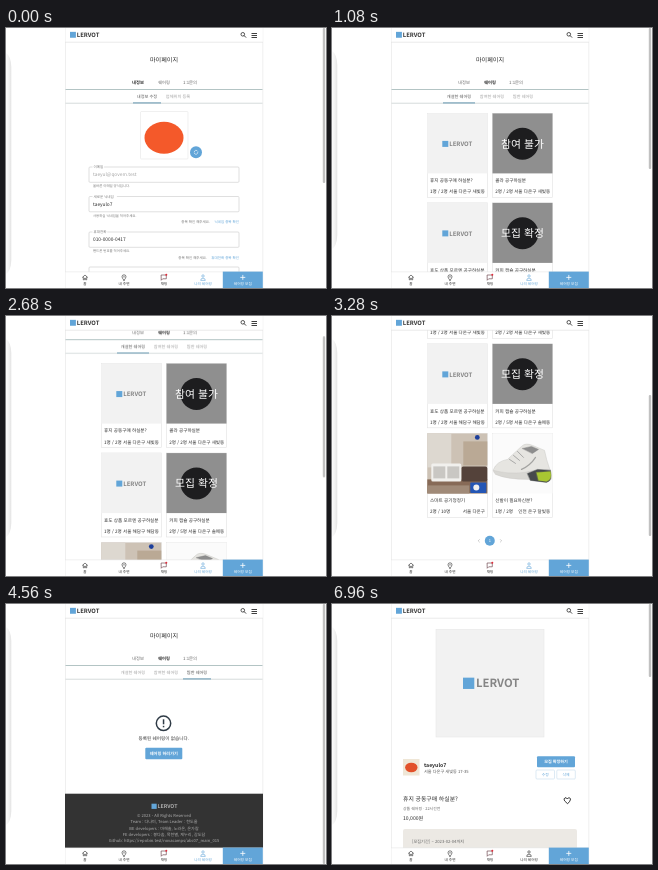
Write an HTML page that moves like this. It is 320 px wide and 260 px high and loops after 7 s.

```html
<!DOCTYPE html>
<html lang="ko">
<head>
<meta charset="utf-8">
<title>마이페이지</title>
<style>
html, body { margin: 0; width: 100%; height: 100%; overflow: hidden; background: #fff; }
svg { display: block; width: 320px; height: 260px; }
text {
  font-family: "Noto Sans CJK KR", "Noto Sans CJK", "Noto Sans", sans-serif;
  text-rendering: geometricPrecision;
  white-space: pre;
}
.show { opacity: 0; animation: 7s step-end infinite; }
.profile { animation-name: profile; }
.sharing { animation-name: sharing; }
.list { animation-name: list; }
.made { animation-name: made; }
.joined { animation-name: joined; }
.empty { animation-name: empty; }
.mypage { animation-name: mypage; }
.detail { animation-name: detail; }
.tipA { animation-name: tipA; }
.tipB { animation-name: tipB; }
.scroll { animation: scroll 7s infinite; }
.thumb { animation: thumb 7s infinite; }
.line { animation: line 7s infinite; }

/* 100% = 7000 ms */
@keyframes profile { 0% { opacity: 1 } 10.857%, 100% { opacity: 0 } }
@keyframes sharing { 0% { opacity: 0 } 10.857% { opacity: 1 } 84%, 100% { opacity: 0 } }
@keyframes list { 0% { opacity: 0 } 10.857% { opacity: 1 } 58.857% { opacity: 0 } 70.857% { opacity: 1 } 84%, 100% { opacity: 0 } }
@keyframes made { 0% { opacity: 0 } 10.857% { opacity: 1 } 58.857%, 100% { opacity: 0 } }
@keyframes empty { 0% { opacity: 0 } 58.857% { opacity: 1 } 70.857%, 100% { opacity: 0 } }
@keyframes joined { 0% { opacity: 0 } 70.857% { opacity: 1 } 84%, 100% { opacity: 0 } }
@keyframes mypage { 0% { opacity: 1 } 84%, 100% { opacity: 0 } }
@keyframes detail { 0% { opacity: 0 } 84%, 100% { opacity: 1 } }
@keyframes tipA { 0% { opacity: 0 } 21.143% { opacity: 1 } 32.571%, 100% { opacity: 0 } }
@keyframes tipB { 0% { opacity: 0 } 75.429% { opacity: 1 } 94.286%, 100% { opacity: 0 } }
@keyframes scroll {
  0%, 34.286% { transform: translateY(0); animation-timing-function: ease-in-out }
  45.714%, 49.714% { transform: translateY(-147px); animation-timing-function: ease-in-out }
  56.571%, 100% { transform: translateY(0) }
}
@keyframes thumb {
  0%, 34.286% { transform: translateY(0); animation-timing-function: ease-in-out }
  45.714%, 49.714% { transform: translateY(79px); animation-timing-function: ease-in-out }
  56.571%, 100% { transform: translateY(0) }
}
@keyframes line {
  0%, 10.856% { x: 127px; width: 28px }
  10.857%, 58.857% { x: 111px; width: 32px; animation-timing-function: cubic-bezier(.4, 0, .2, 1) }
  62.857%, 70.857% { x: 177px; width: 28px; animation-timing-function: cubic-bezier(.4, 0, .2, 1) }
  74.857%, 100% { x: 144px; width: 32px }
}
</style>
</head>
<body>
<svg id="stage" viewBox="0 0 320 260"></svg>
<script>
const BLUE = '#62a5d8', INK = '#2b2b2b', BRAND = 'LERVOT';

// Text is centred vertically on y.
const text = (x, y, size, str, fill = INK, anchor = 'start', weight = 400) =>
  `<text x="${x}" y="${y + size * .36}" font-size="${size}" fill="${fill}" text-anchor="${anchor}" font-weight="${weight}">${str}</text>`;
const mid = (x, y, size, str, fill, weight) => text(x, y, size, str, fill, 'middle', weight);
const rect = (x, y, w, h, fill, more = '') =>
  `<rect x="${x}" y="${y}" width="${w}" height="${h}" fill="${fill}" ${more}/>`;
const circle = (x, y, r, fill, more = '') => `<circle cx="${x}" cy="${y}" r="${r}" fill="${fill}" ${more}/>`;
const ellipse = (x, y, rx, ry, fill) => `<ellipse cx="${x}" cy="${y}" rx="${rx}" ry="${ry}" fill="${fill}"/>`;
const path = (d, stroke, width = .8, fill = 'none') =>
  `<path d="${d}" fill="${fill}" stroke="${stroke}" stroke-width="${width}" stroke-linecap="round" stroke-linejoin="round"/>`;
const group = (name, ...parts) => `<g class="${name}">${parts.join('')}</g>`;
const at = (x, y, ...parts) => `<g transform="translate(${x} ${y})">${parts.join('')}</g>`;
const outline = (color, r = 1) => `stroke="${color}" stroke-width=".6" rx="${r}"`;

const logo = (x, y, size, fill) =>
  rect(x, y - size / 2, size, size, BLUE) + text(x + size * 1.15, y, size, BRAND, fill, 'start', 700);

const leftEdge = (top, bottom) =>
  `<path d="M0 ${top}Q5 ${top + 3} 5.3 ${top + 14}V${bottom - 14}Q5 ${bottom - 3} 0 ${bottom}Z" fill="url(#edge)"/>`;

function head() {
  const tabs = active => ['내정보', '쉐어링', '1:1문의'].map((s, i) =>
    mid([132, 158, 184][i], 54.5, 4.3, s, i === active ? INK : '#666', i === active ? 700 : 400)).join('');
  const subs = active => ['개설한 쉐어링', '참여한 쉐어링', '찜한 쉐어링'].map((s, i) =>
    mid([127, 160, 191][i], 68.5, 4.2, s, i === active ? '#555' : '#a0a0a0')).join('');
  return mid(158, 31.5, 6.1, '마이페이지', INK, 500)
    + rect(59.5, 61, 197, 1, '#b3c4c4') + rect(59.5, 74.8, 197, .7, '#c4cccc')
    + group('show profile', tabs(0), mid(141, 68.5, 4.2, '내정보 수정', '#555'), mid(172, 68.5, 4.2, '업체위치 등록', '#a0a0a0'))
    + group('show sharing', tabs(1))
    + group('show made', subs(0)) + group('show joined', subs(1)) + group('show empty', subs(2))
    + rect(127, 74.3, 28, 1.2, '#7ba6bb', 'class="line"');
}

function field(y, label, value, color, note) {
  return rect(83, y + .5, 150, 15.3, '#fff', outline('#c9c9c9'))
    + rect(86.5, y - 1, label.length * 3.2 + 2, 2.4, '#fff')
    + text(87.5, y + .5, 3.5, label, '#777')
    + text(87, y + 8.2, 4.8, value, color)
    + text(87, y + 19.7, 3.4, note, '#777');
}

function profilePage() {
  const check = (y, x, s) => text(x, y, 3.5, '중복 확인 해주세요.', '#777', 'end') + text(233, y, 3.5, s, BLUE, 'end');
  return rect(134.5, 83.5, 47.5, 47.5, '#fff', outline('#e6e6e6'))
    + ellipse(158, 109.7, 19.5, 16, '#f4592a')
    + circle(190, 124.3, 6, BLUE)
    + path('M188.2 124.1A1.9 1.9 0 0 1 191.7 123.2M191.8 124.5A1.9 1.9 0 0 1 188.3 125.4', '#fff', .6)
    + field(138.5, '이메일', 'taeyul@qovem.test', '#a5a5a5', '올바른 이메일 양식입니다.')
    + field(168, '새로운 닉네임', 'taeyulo7', INK, '사용하실 닉네임을 적어주세요.')
    + check(193.9, 204, '닉네임 중복 확인')
    + field(203.5, '휴대전화', '010-0000-0417', INK, '핸드폰 번호를 적어주세요.')
    + check(229.3, 201, '휴대전화 중복 확인')
    + rect(83, 239, 150, 15.3, '#fff', outline('#c9c9c9'));
}

const blank = rect(0, 0, 60, 60, '#f2f2f2') + logo(15, 30.5, 6, '#858585');
const closed = label => rect(0, 0, 60, 60, '#8f8f8f') + circle(30, 30.3, 16, '#1d1d1f')
  + mid(30, 30.3, 10.8, label, '#fff', 500);
const room = rect(0, 0, 60, 60, '#cdc2b5') + rect(0, 0, 24, 34, '#ddd8d0') + rect(36, 8, 24, 24, '#baa995')
  + rect(0, 46, 60, 14, '#876a57') + rect(34, 33, 26, 15, '#54423a', 'rx="2"') + rect(0, 52, 42, 8, '#a08a78')
  + rect(4, 30, 30, 18, '#f1f0ed', 'rx="1.5"') + rect(6, 33, 12, 12, '#c9c7c3') + rect(20, 33, 12, 12, '#c9c7c3')
  + circle(50, 4, 2.4, '#1d3f9b') + rect(43, 49, 16, 10.5, '#2456b5', 'rx="1"') + circle(49, 54, 3, '#f0f0f0');
const shoe = rect(0, 0, 60, 60, '#fbfbfb')
  + path('M1 36Q4 28 15 26L29 13Q33 9 40 12L52 17Q54 27 57 35L58 43L34 43Q16 41 2 39Z', '#c9c8c5', .5, '#e6e5e1')
  + path('M1 37Q16 41 32 39Q46 35 58 36L59 45Q58 49 50 48L36 46Q14 46 3 41Z', '#c7c6c3', .4, '#d8d7d3')
  + path('M35 40L45 36L58 37Q60 48 54 49L38 47Z', '#46494c', .4, '#46494c')
  + path('M44 39L58 38Q60 46 54 48L46 47Z', '#a8c632', .3, '#a8c632')
  + path('M30 15L39 13L46 16L40 20Z', '#808080', .4, '#8d8d8d')
  + path('M17 26L23 30M21 22L27 27M25 18L31 24', '#999', .8)
  + path('M29 36Q38 32 43 24', '#a3a3a1', 1.2);

function card(i, image, title, count, place) {
  const x = 95.3 + i % 2 * 65.2, y = 85 + Math.floor(i / 2) * 89.5;
  return at(x, y, rect(0, .3, 60, 84, '#fff', outline('#e2e2e2', 0)), at(0, .4, image),
    text(2.7, 67.4, 4.6, title), text(2.7, 78.8, 4.55, count), text(57.7, 78.8, 4.55, place, INK, 'end'));
}

function listPage() {
  return card(0, blank, '휴지 공동구매 하실분?', '1명 / 2명', '서울 다온구 새빛동')
    + card(1, closed('참여 불가'), '콜라 공구하실분', '2명 / 2명', '서울 다온구 새빛동')
    + card(2, blank, '효도 상품 모르엔 공구하실분', '1명 / 2명', '서울 해담구 해담동')
    + card(3, closed('모집 확정'), '커피 캡슐 공구하실분', '2명 / 5명', '서울 다온구 솔메동')
    + card(4, room, '스마트 공기청정기', '2명 / 10명', '서울 다온구')
    + card(5, shoe, '신발이 필요하신분?', '1명 / 2명', '인천 온구 달빛동')
    + circle(157.8, 371.8, 5, BLUE) + mid(157.8, 371.8, 4, '1', '#fff')
    + path('M147.4 370.6L146.2 371.8L147.4 373M168.4 370.6L169.6 371.8L168.4 373', '#999', .5);
}

function emptyPage() {
  const lines = ['© 2023 - All Rights Reserved', 'Team : 다나미, Team Leader : 한도울',
    'BE developers : 마해솔, 노라온, 온가람', 'FE developers : 봉다솜, 목한별, 제누리, 감도담',
    'Github: https://repobin.test/novacamps/abc07_main_015'];
  return circle(157.5, 119.3, 7.2, 'none', 'stroke="#2f3b46" stroke-width="1.5"')
    + rect(156.8, 115.3, 1.5, 5, '#2f3b46') + rect(156.8, 121.8, 1.5, 1.5, '#2f3b46')
    + mid(157.8, 134.5, 4.6, '등록된 쉐어링이 없습니다.')
    + rect(139.3, 143.8, 37, 11.4, BLUE, 'rx="1"') + mid(157.8, 149.4, 4.2, '쉐어링 하러가기', '#fff', 700)
    + rect(59, 189.7, 198, 54.3, '#333')
    + logo(145.5, 202.3, 5.2, '#b0b0b0')
    + lines.map((s, i) => mid(158, 211.7 + i * 6.3, 4.1, s, '#adadad')).join('');
}

function detailPage() {
  const small = (x, s) => rect(x, 166, 18.5, 9, '#fff', outline('#c6dcec')) + mid(x + 9.2, 170.5, 3.8, s, BLUE);
  return rect(104, 25.5, 108, 107.5, '#f2f2f2', outline('#e6e6e6', 0)) + logo(131, 79.3, 11.3, '#858585')
    + rect(71, 155, 16.5, 16.5, '#efe6d6') + ellipse(79.3, 163.5, 6.2, 4.8, '#e2512a')
    + text(92, 160.7, 5.2, 'taeyulo7', INK, 'start', 700)
    + text(92, 167.2, 4.15, '서울 다온구 새빛동 17-35', '#555')
    + rect(205, 152.3, 38, 11, BLUE, 'rx="1"') + mid(224, 157.8, 4.1, '모집 확정하기', '#fff', 700)
    + small(204, '수정') + small(224.8, '삭제')
    + text(71, 195.3, 5.9, '휴지 공동구매 하실분?', INK, 'start', 500)
    + text(71, 204.8, 3.9, '상품 쉐어링 · 22시간전', '#666')
    + text(71, 214, 5.1, '10,000원', INK, 'start', 500)
    + path('M235.3 199.5L232.6 196.9Q231.2 194.6 233 193.8Q234.5 193.4 235.3 195Q236.1 193.4 237.6 193.8Q239.4 194.6 238 196.9Z', '#222', .9)
    + rect(71, 225, 174, 40, '#ece9e4', 'rx="2"')
    + text(80, 237.6, 4.2, '[모집기간] ~ 2023-02-04까지', '#666');
}

function header() {
  return rect(59.6, 0, 197, 14, '#fff') + rect(59, 13.8, 198, .7, '#e2e2e2') + logo(64, 6.8, 5.9, '#333')
    + circle(236.8, 6.3, 1.8, 'none', `stroke="${INK}" stroke-width=".8"`) + path('M238.2 7.7L239.8 9.3', INK, .9)
    + [5, 7, 9].map(y => rect(245.5, y, 5.5, .9, INK)).join('');
}

function nav() {
  const person = color => circle(197, 248, 1.2, 'none', `stroke="${color}" stroke-width=".6"`)
    + path('M194.7 252Q194.7 250.2 197 250.2Q199.3 250.2 199.3 252Z', color, .6)
    + mid(197, 255.9, 3.6, '나의 쉐어링', color);
  return rect(59.6, 244, 197, 16, '#fff') + rect(59, 243.6, 198, .6, '#e6e6e6') + rect(216.8, 243.6, 40, 16.4, BLUE)
    + path('M76.5 249.3L79 247L81.5 249.3M77.3 249V251.8H78.4V250.3H79.6V251.8H80.7V249', INK, .6)
    + path('M118 252.4Q116 250 116 248.8A2 2 0 0 1 120 248.8Q120 250 118 252.4Z', INK, .6) + circle(118, 248.8, .6, INK)
    + path('M155.5 247H160.3V250.8H156.7L155.5 252Z', '#5b3038', .6) + circle(160.3, 246.7, 1, '#e02d3c')
    + path('M234.7 249.4H238.9M236.8 247.3V251.5', '#fff', .8)
    + mid(79, 255.9, 3.6, '홈') + mid(118, 255.9, 3.6, '내 주변') + mid(158, 255.9, 3.6, '채팅')
    + mid(236.8, 255.9, 3.7, '쉐어링 모집', '#fff', 500)
    + group('show mypage', person(BLUE)) + group('show detail', person(INK));
}

const tip = n => rect(0, 253.8, 51.5, 6.2, '#161616') + text(1, 257, 3.5, `https://lervot.test/meeting/${n}`, '#eee');
const thumb = h => rect(316.8, 0, 2.4, h, '#c1c1c1', 'rx="1"');

document.getElementById('stage').innerHTML =
  `<defs><linearGradient id="edge" gradientUnits="userSpaceOnUse" x1="0" y1="0" x2="5.3" y2="0">
    <stop offset="0" stop-color="#fbfbfb"/><stop offset=".5" stop-color="#f2f2f2"/><stop offset="1" stop-color="#e3e3e3"/>
  </linearGradient></defs>`
  + rect(0, 0, 320, 260, '#fff')
  + group('show profile', leftEdge(25, 246))
  + group('show sharing', leftEdge(23, 221)) + group('show detail', leftEdge(23, 221))
  + rect(59, 0, .6, 260, '#e4e4e4') + rect(256.6, 0, .6, 260, '#e4e4e4')
  + group('scroll', group('show mypage', head()), group('show list', listPage()))
  + group('show profile', profilePage())
  + group('show empty', emptyPage())
  + group('show detail', detailPage())
  + header()
  + nav()
  + group('show profile', thumb(155)) + group('show list', group('thumb', thumb(141)))
  + group('show empty', thumb(260)) + group('show detail', thumb(73))
  + group('show tipA', tip(7)) + group('show tipB', tip(6));
</script>
</body>
</html>
```
